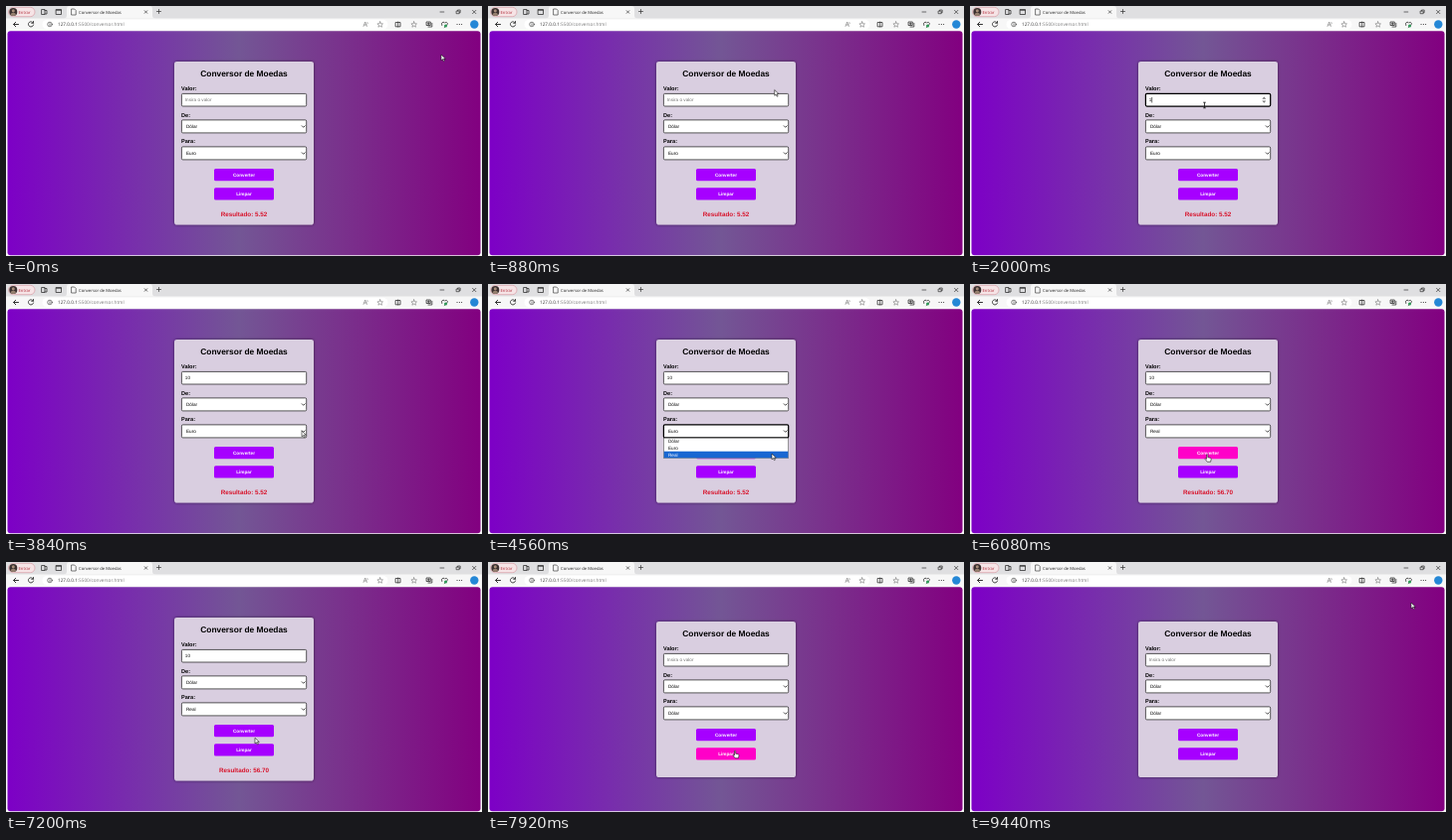
An HTML page for the animation above (9520 ms loop, 478 by 252 pixels).

```html
<!DOCTYPE html>
<html lang="pt">
<head>
<meta charset="utf-8">
<title>Conversor de Moedas</title>
<style>
  html, body { margin: 0; width: 100%; height: 100%; overflow: hidden; background: #f7f7f7; }
  svg { display: block; width: 100vw; height: 100vh; }
  text { font-family: "Liberation Sans", Arial, sans-serif; font-size: 4.67px; text-rendering: geometricPrecision; }
  .ui { font-family: "Open Sans", "Noto Sans", sans-serif; }
  .bold { font-weight: bold; }
  .label { font-weight: bold; font-size: 5.6px; }
  .mid { text-anchor: middle; }
  .line { fill: none; stroke: #333; stroke-width: .8; stroke-linecap: round; stroke-linejoin: round; }
  .field { fill: #fff; stroke: #222; stroke-width: .75; }
  .field.focus { stroke: #000; stroke-width: 1.25; }
</style>
</head>
<body>
<svg viewBox="0 0 478 252" preserveAspectRatio="none">
  <defs>
    <linearGradient id="page">
      <stop offset="0" stop-color="#7d00c6"/>
      <stop offset=".49" stop-color="#735695"/>
      <stop offset="1" stop-color="#820080"/>
    </linearGradient>
    <filter id="shadow" x="-10%" y="-10%" width="120%" height="120%">
      <feDropShadow dx="0" dy="0" stdDeviation="1.7" flood-opacity=".55"/>
    </filter>
  </defs>

  <!-- browser window -->
  <rect width="478" height="252" fill="#f7f7f7"/>
  <rect width="478" height="12.5" fill="#dfdfe1"/>
  <path d="M58 12.5q3 0 3-3V3q0-3 3-3h80q3 0 3 3v6.500q0 3 3 3z" fill="#f7f7f7"/>
  <rect x="2.500" y="1.300" width="26.500" height="9.400" rx="4.700" fill="#f6e4e6" stroke="#d3929a" stroke-width=".6"/>
  <circle cx="7.300" cy="6" r="4" fill="#3b302f"/>
  <path d="M4.600 9q.2-2.500 2.700-2.500T10 9q-2.700 2-5.400 0z" fill="#96806f"/>
  <circle cx="7.300" cy="4.800" r="1.500" fill="#a98e7b"/>
  <text class="ui" x="12.500" y="7.600" font-size="4.200" fill="#b02a37" style="font-size:4.200px">Entrar</text>
  <g class="line">
    <path d="M36 3.500h3v5h-3zM39 4.500h2v3.500h-2"/>
    <path d="M50.500 3.500h5v5h-5zM50.500 4.300h5"/>
    <path d="M66 3h2.700l1.500 1.500V9H66z" stroke-width=".65"/>
    <path d="M139.200 4.700l2.600 2.600m0-2.600l-2.600 2.600M151.500 5.500h4m-2-2v4" stroke-width=".7"/>
    <path d="M436 6h3.800M452.500 5h2.700v2.700h-2.700zM453.500 5V4h2.700v2.700h-1M468.500 4.300l3.400 3.400m0-3.400l-3.400 3.400" stroke-width=".7"/>
  </g>
  <rect x="36.500" y="13.800" width="347" height="9.600" rx="4.800" fill="#fff"/>
  <g class="line">
    <path d="M12.500 18.500h-5l2.200-2.200m-2.200 2.200l2.200 2.200" stroke-width="1"/>
    <path d="M27.300 17a2.600 2.600 0 1 0 .3 2M27.500 15.500V17.300h-1.800" stroke-width=".9"/>
    <circle cx="44" cy="18.500" r="2.300" stroke-width=".6"/>
    <path d="M44 18.300v1.300M44 17.200v.1" stroke-width=".6"/>
    <path d="M359 20.500l1.700-4.500 1.700 4.500m-2.800-1.500h2.200M363 16.500q.8.700 0 1.500" stroke="#777" stroke-width=".6"/>
    <path id="star" d="M375.700 15.800l.8 1.900 2 .2-1.500 1.300.5 2-1.800-1-1.800 1 .5-2-1.500-1.300 2-.2z" stroke="#777" stroke-width=".6"/>
    <use href="#star" x="34"/>
    <path d="M391.500 16.500h4.500v4.300h-4.500zM393.700 16v5"/>
    <path d="M422.500 16h3.800v3.500h-3.800zM424 21h3.800v-3.700M424.400 16.800v2m-1-1h2"/>
    <path d="M437.700 19.500q-1-3 1.300-3.300 1.300 0 1.600 1 .5-1 1.700-.8 2 .6.500 3L440.200 21.500"/>
    <path d="M453 18.500h.1m2.200 0h.1m2.200 0h.1" stroke-width="1"/>
  </g>
  <circle cx="441.500" cy="20" r="1.500" fill="#2c9a55"/>
  <circle cx="470.300" cy="18.500" r="4.200" fill="#2487d6"/>
  <text class="ui" x="73" y="7.600" fill="#222" style="font-size:4.200px">Conversor de Moedas</text>
  <text class="ui" x="52" y="20.200" fill="#333" style="font-size:4.700px">127.0.0.1<tspan fill="#777">:5500/conversor.html</tspan></text>

  <!-- page -->
  <rect x="1.500" y="25.300" width="475" height="226" rx="3" fill="url(#page)"/>
  <g id="card">
    <rect id="panel" x="169" y="56" width="140" height="164.500" rx="2.800" fill="#d9cee0" filter="url(#shadow)"/>
    <text class="bold mid" x="239" y="71.200" style="font-size:8.400px">Conversor de Moedas</text>
    <text class="label" x="176" y="85">Valor:</text>
    <text class="label" x="176" y="111.500">De:</text>
    <text class="label" x="176" y="138.300">Para:</text>
    <rect class="field" id="amountBox" x="176.400" y="88.400" width="125.300" height="12.600" rx="1.200"/>
    <rect class="field" x="176.400" y="114.900" width="125.300" height="13" rx="1.200"/>
    <rect class="field" id="toBox" x="176.400" y="141.900" width="125.300" height="13" rx="1.200"/>
    <text id="amount" x="179.800" y="96.300"></text>
    <path id="caret" d="M182.700 92v5.500" stroke="#000" stroke-width=".6"/>
    <path id="spinner" d="M293.300 93.800l2-2.300 2 2.300zM293.300 95.400l2 2.300 2-2.300z" fill="#777"/>
    <text x="181" y="123">Dólar</text>
    <text id="to" x="181" y="150"></text>
    <path class="line" d="M297.200 120.800l1.500 1.500 1.500-1.500M297.200 147.800l1.500 1.500 1.500-1.500" style="stroke:#111"/>
    <rect id="convert" x="209" y="164" width="60" height="12.300" rx="1.500"/>
    <rect id="clear" x="209" y="183.300" width="60" height="12.300" rx="1.500"/>
    <text class="bold mid" x="239" y="171.800" fill="#fff">Converter</text>
    <text class="bold mid" x="239" y="191.100" fill="#fff">Limpar</text>
    <text class="bold mid" id="result" x="239" y="211.800" fill="#d8142c" style="font-size:6.300px"></text>
    <g id="menu">
      <rect x="176.400" y="155.200" width="125.300" height="20.400" fill="#fff" stroke="#555" stroke-width=".6"/>
      <rect id="choice" x="176.700" width="124.700" height="6.600" fill="#1967d2"/>
    </g>
  </g>

  <g id="cursor" stroke="#111" stroke-width=".6" stroke-linejoin="round">
    <path id="arrow" d="M0 0v5.800l1.400-1.300 1 2.200 1-.5-1-2.100h1.900z" fill="#fff"/>
    <path id="beam" d="M-1.300-2.800h2.600M0-2.800v5.600M-1.300 2.800h2.600" fill="none" stroke-width=".8"/>
    <path id="hand" d="M-.5.500q.6-.8 1.200 0v2.700l2.700.6q.8.300.6 1.300l-.5 2.600H.2L-2 5q-.2-1 .6-.8l.9.700z" fill="#fff"/>
  </g>
</svg>
<script>
  const LOOP = 9520, STEP = 80;
  const TYPE_ONE = 1760, TYPE_TEN = 2320, OPEN = 4000, PICK = 4640, CONVERT = 5840, CLEAR = 7760;
  const OPTIONS = ['Dólar', 'Euro', 'Real'];

  // time, x, y of the pointer tip
  const PATH = [
    [0, 437, 49], [240, 437, 49], [1200, 235.5, 97], [1360, 235.5, 97], [1760, 235.5, 100],
    [2560, 235.5, 100], [3440, 291, 144], [3760, 297, 148], [4080, 297, 148],
    [4560, 285, 171], [4800, 285, 171], [5280, 235, 176], [5440, 235, 176],
    [5600, 237, 171], [5920, 237, 171], [6800, 250, 177.300], [7280, 250, 177.300],
    [7600, 248, 190], [8320, 248, 190], [9280, 441, 43], [9440, 443, 41]
  ];

  const el = id => document.getElementById(id);
  const show = (id, on) => el(id).setAttribute('visibility', on ? 'visible' : 'hidden');
  const inside = ([x, y], left, top, right, bottom) => x >= left && x <= right && y >= top && y <= bottom;

  const optionTexts = OPTIONS.map((name, i) => {
    const text = document.createElementNS('http://www.w3.org/2000/svg', 'text');
    text.textContent = name;
    text.setAttribute('x', 181);
    text.setAttribute('y', 160.300 + i * 6.600);
    el('menu').append(text);
    return text;
  });

  function pointerAt(t) {
    const next = PATH.findIndex(p => p[0] > t);
    if (next < 0) return PATH.at(-1).slice(1);
    const [t0, x0, y0] = PATH[next - 1], [t1, x1, y1] = PATH[next];
    const u = (t - t0) / (t1 - t0), k = u * u * (3 - 2 * u);
    return [x0 + (x1 - x0) * k, y0 + (y1 - y0) * k];
  }

  function draw(t) {
    const cleared = t >= CLEAR, shift = cleared ? 4 : 0;
    const tip = pointerAt(t), local = [tip[0], tip[1] - shift];
    const open = t >= OPEN && t < PICK;
    const typing = t >= 1360 && t < 3040;
    const overInput = inside(local, 176, 88, 302, 101);
    const overConvert = !open && inside(local, 209, 164, 269, 176.400);
    const overClear = inside(local, 209, 183.300, 269, 195.600);

    el('card').setAttribute('transform', `translate(0 ${shift})`);
    el('panel').setAttribute('height', cleared ? 157 : 164.500);

    const value = cleared || t < TYPE_ONE ? '' : t < TYPE_TEN ? '1' : '10';
    el('amount').textContent = value || 'Insira o valor';
    el('amount').setAttribute('fill', value ? '#111' : '#757575');
    el('amountBox').classList.toggle('focus', typing);
    el('toBox').classList.toggle('focus', t >= OPEN && t < CONVERT);
    el('caret').setAttribute('transform', `translate(${value.length * 2.600 - 2.600})`);
    show('caret', typing);
    show('spinner', overInput || typing);

    el('to').textContent = OPTIONS[cleared ? 0 : t < PICK ? 1 : 2];
    el('result').textContent = cleared ? '' : 'Resultado: ' + (t < CONVERT ? '5.52' : '56.70');
    el('convert').setAttribute('fill', overConvert ? '#ff00c8' : '#a600ff');
    el('clear').setAttribute('fill', overClear ? '#ff00c8' : '#a600ff');

    const chosen = tip[1] < 155.500 ? 1 : Math.min(2, Math.floor((tip[1] - 155.500) / 6.600));
    show('menu', open);
    el('choice').setAttribute('y', 155.500 + chosen * 6.600);
    optionTexts.forEach((text, i) => text.setAttribute('fill', i === chosen ? '#fff' : '#111'));

    const kind = overConvert || overClear ? 'hand' : overInput ? 'beam' : 'arrow';
    ['arrow', 'beam', 'hand'].forEach(id => show(id, id === kind));
    el('cursor').setAttribute('transform', `translate(${tip})`);
  }

  const start = performance.now();
  function tick() {
    const t = (performance.now() - start) % LOOP;
    draw(Math.floor(t / STEP) * STEP);
    requestAnimationFrame(tick);
  }
  tick();
</script>
</body>
</html>
```
